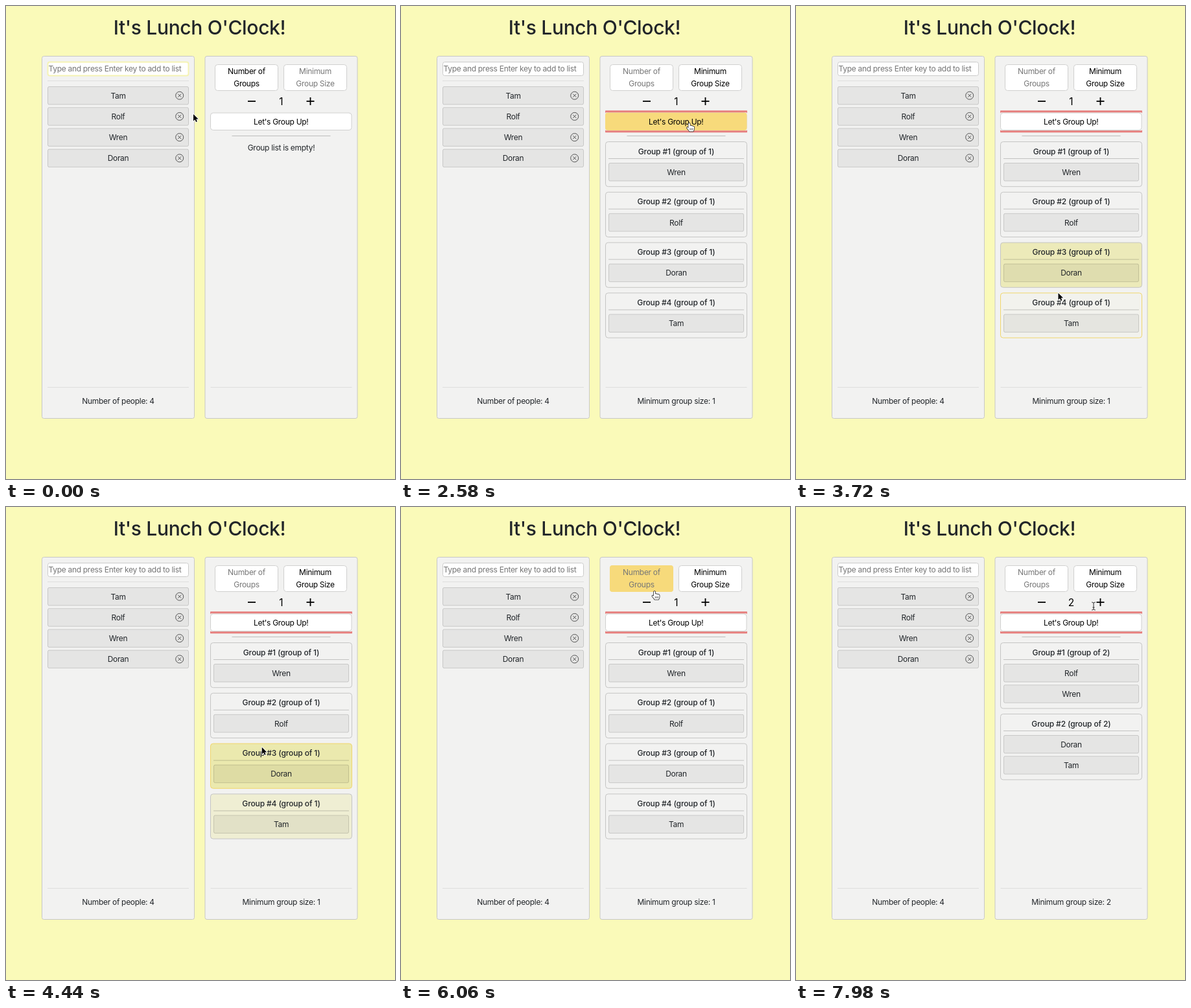
Write an HTML page with a canvas that moves like this. It is 600 px wide and 730 px high and loops after 8 s.

```html
<!DOCTYPE html>
<html lang="en">
<head>
<meta charset="utf-8">
<title>It's Lunch O'Clock!</title>
<style>
  html, body { margin: 0; width: 100%; height: 100%; overflow: hidden; background: #fafab9; }
  canvas { display: block; width: 600px; height: 730px; }
</style>
</head>
<body>
<canvas id="stage" width="600" height="730"></canvas>
<script>
const ctx = document.getElementById('stage').getContext('2d');
const LOOP = 8000, TICK = 60, STEP = 20, RISE = 150, FALL = 300;
const PICK_MIN = 960, GROUP_A = 2220, PLUS = 6480, GROUP_B = 7200;
const LEFT = 173, RIGHT = 424.5, ROW = 32.2;
const INK = '#212529', MUTED = '#777', RULE = '#dededd', RED = '#e67f7e';
const people = ['Tam', 'Rolf', 'Wren', 'Doran'];

const buttons = {
  number: { x: 322, y: 90, w: 98, h: 41 },
  min: { x: 428, y: 90, w: 98, h: 41 },
  go: { x: 315, y: 164.5, w: 218.5, h: 27.5 },
  plus: { x: 461, y: 139, w: 17, h: 17 }
};

// Pointer stops: arrival time, place and how long it rests there
const stops = [
  { t: 0, x: 289, y: 167 },
  { t: 840, x: 465, y: 112, rest: 540 },
  { t: 2100, x: 445, y: 180, rest: 420 },
  { t: 3120, x: 430, y: 202 },
  { t: 3240, x: 410, y: 405 },
  { t: 4140, x: 400, y: 474 },
  { t: 4680, x: 391, y: 297 },
  { t: 5280, x: 384, y: 218 },
  { t: 5940, x: 391, y: 130, rest: 120 },
  { t: 6420, x: 469, y: 146, rest: 180 },
  { t: 7080, x: 451, y: 179, rest: 420 },
  { t: 7860, x: 459, y: 153 }
];

const clamp = v => Math.max(0, Math.min(1, v));
const smooth = k => k * k * (3 - 2 * k);
const inside = (p, b) => p.x >= b.x && p.x <= b.x + b.w && p.y >= b.y && p.y <= b.y + b.h;

function pointer(t) {
  const next = stops.findIndex(s => s.t > t);
  if (next < 0) return stops[stops.length - 1];
  const a = stops[next - 1], b = stops[next];
  const leave = a.t + (a.rest || 0);
  const k = smooth(clamp((t - leave) / (b.t - leave)));
  return { x: a.x + (b.x - a.x) * k, y: a.y + (b.y - a.y) * k };
}

function cards(t) {
  if (t < GROUP_A) return [];
  const groups = t < GROUP_B ? [[2], [1], [3], [0]] : [[1, 2], [3, 0]];
  let y = 209.5;
  return groups.map(members => {
    const h = 37 + ROW * members.length;
    const card = { x: 315.5, y, w: 218, h, members };
    y += h + 8.6;
    return card;
  });
}

// Hover strength of each box at time t, rising fast and fading slowly
function hoverLevels(t) {
  const level = {};
  for (let s = 0; s <= t; s += STEP) {
    const p = pointer(s);
    const update = (key, box) => {
      level[key] = clamp((level[key] || 0) + (inside(p, box) ? STEP / RISE : -STEP / FALL));
    };
    for (const key in buttons) update(key, buttons[key]);
    cards(s).forEach((c, i) => update(i, c));
  }
  for (const key in level) level[key] = smooth(level[key]);
  return level;
}

function text(str, x, y, { size = 12, weight = 400, color = INK, gap = -0.3, align = 'center' } = {}) {
  ctx.font = `${weight} ${size}px Inter, "Liberation Sans", sans-serif`;
  ctx.letterSpacing = gap + 'px';
  ctx.textAlign = align;
  ctx.fillStyle = color;
  ctx.fillText(str, x, y + size * 0.365);
}

function box(x, y, w, h, r, fill, stroke, width = 1) {
  ctx.beginPath();
  ctx.roundRect(x, y, w, h, r);
  if (fill) { ctx.fillStyle = fill; ctx.fill(); }
  if (stroke) { ctx.strokeStyle = stroke; ctx.lineWidth = width; ctx.stroke(); }
}

function line(x0, y0, x1, y1, color, width = 1) {
  ctx.beginPath();
  ctx.moveTo(x0, y0);
  ctx.lineTo(x1, y1);
  ctx.strokeStyle = color;
  ctx.lineWidth = width;
  ctx.stroke();
}

const rule = (center, y, w, color = RULE) => line(center - w / 2, y, center + w / 2, y, color);

function panel(center, footer) {
  box(center - 117.5, 77.5, 235, 559, 3, '#f2f2f1', '#c8c8c6');
  rule(center, 588.5, 218);
  text(footer, center, 609.5);
}

function row(center, y, w, name) {
  box(center - w / 2, y, w, 27.5, 2, 'rgba(0,0,0,.055)', 'rgba(0,0,0,.15)');
  text(name, center, y + 14);
}

function removeIcon(x, y) {
  ctx.beginPath();
  ctx.arc(x, y, 6, 0, Math.PI * 2);
  ctx.strokeStyle = '#444';
  ctx.lineWidth = 0.9;
  ctx.stroke();
  for (const d of [-2.5, 2.5]) line(x - 2.5, y - d, x + 2.5, y + d, '#444', 0.9);
}

function leftPanel(t) {
  const focused = t < PICK_MIN;
  panel(LEFT, `Number of people: ${people.length}`);
  box(64.5, 86.5, 217, 21, 3, '#fff', focused ? '#f5f3b4' : '#cbcbca', focused ? 2 : 1);
  text('Type and press Enter key to add to list', 65.5, 97, { color: '#757575', align: 'left' });
  if (focused && (t + 200) % 1000 >= 500) line(65.5, 90, 65.5, 104, '#333');
  rule(LEFT, 115.5, 218);
  people.forEach((name, i) => {
    const y = 124.5 + i * ROW;
    row(LEFT, y, 217, name);
    removeIcon(267.7, y + 13.7);
  });
}

function button(b, level, lines, color) {
  box(b.x + 0.5, b.y + 0.5, b.w - 1, b.h - 1, 4, '#fff', '#d0d0cf');
  if (level) box(b.x, b.y, b.w, b.h, 4, `rgba(247,218,123,${level})`);
  const top = b.y + b.h / 2 - (lines.length - 1) * 9.4;
  lines.forEach((s, i) => text(s, b.x + b.w / 2, top + i * 18.8, { color }));
}

function groupCard({ x, y, w, h, members }, i, level, hovered) {
  box(x, y, w, h, 4, `rgba(226,222,106,${(level || 0) / 2})`, hovered ? '#f0d66c' : '#c5c5c4');
  text(`Group #${i + 1} (group of ${members.length})`, RIGHT, y + 14.8, { weight: 500, gap: -0.12 });
  rule(RIGHT, y + 26, 209, 'rgba(0,0,0,.2)');
  members.forEach((m, k) => row(RIGHT, y + 33 + k * ROW, 208, people[m]));
}

function counter(size) {
  line(373, 147, 385, 147, '#000', 1.8);
  line(463.5, 147, 475.5, 147, '#000', 1.8);
  line(469.5, 141, 469.5, 153, '#000', 1.8);
  text(String(size), RIGHT, 147.3, { size: 15.5, color: '#000', gap: 0 });
}

// Focus ring, cut off at the sides of the scrolling column
function goRing() {
  ctx.save();
  ctx.beginPath();
  ctx.rect(315, 158, 219, 40);
  ctx.clip();
  box(313.5, 162.7, 222, 31, 3, null, RED, 3);
  ctx.restore();
}

function rightPanel(t, p, list) {
  const hover = hoverLevels(t), { number, min, go } = buttons;
  const byMin = t >= PICK_MIN, size = t < PLUS ? 1 : 2;
  const pressed = GROUP_A - TICK;
  panel(RIGHT, list.length ? `Minimum group size: ${size}` : '');
  button(number, hover.number, ['Number of', 'Groups'], byMin ? MUTED : '#000');
  button(min, hover.min, ['Minimum', 'Group Size'], byMin ? '#000' : MUTED);
  if (byMin && t < pressed) box(427, 88, 101.5, 44, 4, null, RED, 3);
  counter(size);
  button(go, hover.go, ["Let's Group Up!"], '#000');
  if ((t >= pressed && t < PLUS) || t >= GROUP_B) goRing();
  rule(RIGHT, 200.5, 152, '#bdbdbc');
  list.forEach((c, i) => groupCard(c, i, hover[i], inside(p, c)));
  if (!list.length) text('Group list is empty!', RIGHT, 218.5);
}

function cursorKind(p, list) {
  if (Object.values(buttons).some(b => inside(p, b))) return 'hand';
  const texts = list.map(c => ({ x: 365, y: c.y + 6, w: 120, h: 19 }));
  texts.push({ x: 385, y: 139, w: 76, h: 19 });
  return texts.some(b => inside(p, b)) ? 'beam' : 'arrow';
}

const shapes = {
  arrow: new Path2D('M0 0V10.6L2.5 8.3L4.1 12L5.9 11.2L4.3 7.6H7.6Z'),
  hand: new Path2D('M-1.2 .8Q0-.6 1.2.8V4.4Q2.4 3.4 3.3 4.7Q4.7 4 5.4 5.2Q7.4 4.6 7.6 6.4V9Q7.2 11.2 6.2 12.8H.3Q-.8 10.8-3.4 8.2Q-4 6.4-2.6 6.5L-1.2 7.8Z'),
  beam: new Path2D('M-2.8-6Q0-6 0-4.4Q0-6 2.8-6M0-4.4V4.4M-2.8 6Q0 6 0 4.4Q0 6 2.8 6M-1.5 2H1.5')
};

function cursor(p, kind) {
  const paint = (color, width) => {
    ctx.strokeStyle = color;
    ctx.lineWidth = width;
    ctx.stroke(shapes[kind]);
  };
  ctx.save();
  ctx.translate(p.x, p.y);
  ctx.lineJoin = 'round';
  if (kind === 'beam') {
    paint('rgba(255,255,255,.7)', 2.4);
    paint('#222', 1);
  } else {
    const arrow = kind === 'arrow';
    paint(arrow ? '#fff' : '#222', arrow ? 1.8 : 1.5);
    ctx.fillStyle = arrow ? '#000' : '#fff';
    ctx.fill(shapes[kind]);
    if (!arrow) for (let x = 1.3; x < 6; x += 2) line(x, 8, x, 10.8, '#333', 0.8);
  }
  ctx.restore();
}

function draw(now) {
  const t = Math.floor((now % LOOP) / TICK) * TICK;
  const p = pointer(t), list = cards(t);
  ctx.fillStyle = '#fafab9';
  ctx.fillRect(0, 0, 600, 730);
  text("It's Lunch O'Clock!", 298.5, 33, { size: 30, weight: 500, gap: -0.33 });
  leftPanel(t);
  rightPanel(t, p, list);
  cursor(p, cursorKind(p, list));
}

const start = performance.now();
function frame() {
  draw(performance.now() - start);
  requestAnimationFrame(frame);
}
frame();
</script>
</body>
</html>
```
